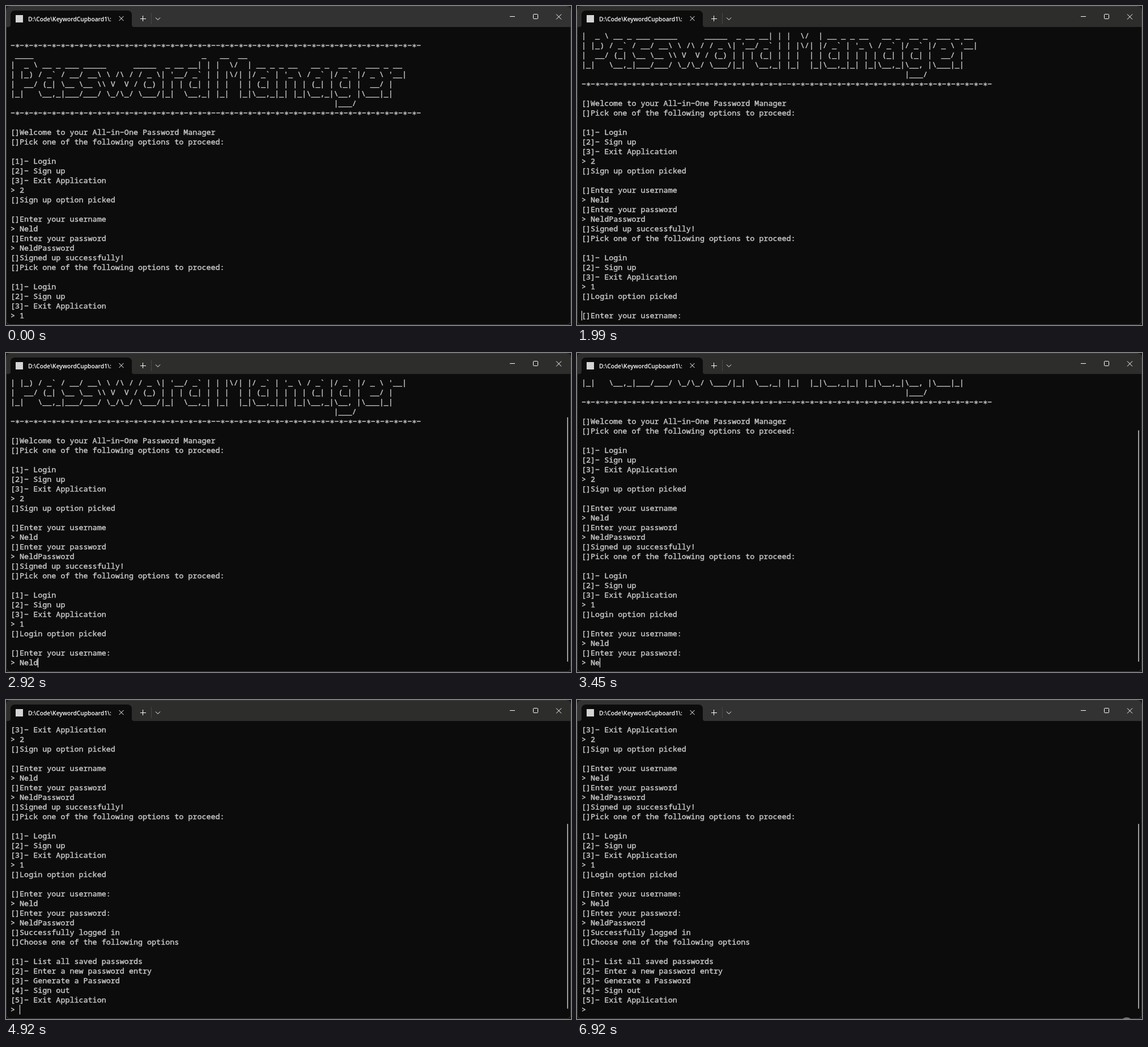
Recreate the animation shown at these times as an HTML page. Size 997 px wide and 562 px high, loop 6980 ms.

```html
<!DOCTYPE html>
<html lang="en">
<head>
<meta charset="utf-8">
<title>Terminal session</title>
<style>
  html, body { margin: 0; width: 100%; height: 100%; overflow: hidden; background: #161616; }
  #stage { position: relative; width: 997px; height: 562px; overflow: hidden; }
  #stage > * { position: absolute; }
  svg { left: 0; top: 0; overflow: visible; }
  #title {
    left: 39px; top: 14px; width: 149px; overflow: hidden; white-space: nowrap;
    font: 600 10.2px/18px "Open Sans", "Noto Sans", sans-serif; color: #fff;
  }
  #log {
    left: 8px; top: 44px; width: 970px; height: 510px; margin: 0; overflow: hidden;
    font: 400 13.4px/17px "Noto Sans Mono", "DejaVu Sans Mono", monospace;
    font-variant-ligatures: none; color: #ccc; -webkit-text-stroke: .4px #ccc;
  }
  #caret { top: 537px; width: 1px; height: 17px; background: #fff; }
  #thumb { left: 990px; width: 2px; border-radius: 1px; background: #9d9d9d; }
  #ring { width: 22px; height: 22px; margin: -11px 0 0 -11px; border-radius: 50%; }
</style>
</head>
<body>
<div id="stage">
  <svg width="997" height="562" fill="none" stroke="#fff">
    <rect x=".5" y=".5" width="996" height="561" rx="7" fill="#0c0c0c" stroke="#3d3d3d"/>
    <path id="bar" d="M1 37V8Q1 1 8 1H989Q996 1 996 8V37Z" stroke="none"/>
    <path d="M4 37Q8 37 8 33V16Q8 8 16 8H214Q222 8 222 16V33Q222 37 226 37Z" fill="#0c0c0c" stroke="none"/>
    <rect x="17" y="16" width="13" height="13" fill="#d4d4d4" stroke="none"/>
    <path d="M256.5 12V32" stroke="#464646"/>
    <path d="M199.5 18L207.5 26M207.5 18L199.5 26M237 22.5H247M241.5 17V27M264 20.5L268 24.5L272 20.5"/>
    <path d="M889 18.5H898M971 14.5L980 23.5M980 14.5L971 23.5"/>
    <rect x="930.5" y="14.5" width="8" height="8" rx="1"/>
  </svg>
  <div id="title">D:\Code\KeywordCupboard1\:</div>
  <pre id="log">

-*-*-*-*-*-*-*-*-*-*-*-*-*-*-*-*-*-*-*-*-*-*--*-*-*-*-*-*-*-*-*-*-*-*-*-*-*-*-*-*-*-*-*-*-
 ____                                     _   __  __
|  _ \ __ _ ___ _____      _____  _ __ __| | |  \/  | __ _ _ __   __ _  __ _  ___ _ __
| |_) / _` / __/ __\ \ /\ / / _ \| '__/ _` | | |\/| |/ _` | '_ \ / _` |/ _` |/ _ \ '__|
|  __/ (_| \__ \__ \\ V  V / (_) | | | (_| | | |  | | (_| | | | | (_| | (_| |  __/ |
|_|   \__,_|___/___/ \_/\_/ \___/|_|  \__,_| |_|  |_|\__,_|_| |_|\__,_|\__, |\___|_|
                                                                       |___/
-*-*-*-*-*-*-*-*-*-*-*-*-*-*-*-*-*-*-*-*-*-*--*-*-*-*-*-*-*-*-*-*-*-*-*-*-*-*-*-*-*-*-*-*-

[]Welcome to your All-in-One Password Manager
[]Pick one of the following options to proceed:

[1]- Login
[2]- Sign up
[3]- Exit Application
> 2
[]Sign up option picked

[]Enter your username
> Neld
[]Enter your password
> NeldPassword
[]Signed up successfully!
[]Pick one of the following options to proceed:

[1]- Login
[2]- Sign up
[3]- Exit Application
> 1
[]Login option picked

[]Enter your username:
> Neld
[]Enter your password:
> NeldPassword
[]Successfully logged in
[]Choose one of the following options

[1]- List all saved passwords
[2]- Enter a new password entry
[3]- Generate a Password
[4]- Sign out
[5]- Exit Application
> </pre>
  <div id="caret"></div>
  <div id="thumb"></div>
  <div id="ring"></div>
  <svg id="mouse" width="12" height="18">
    <path d="M.5 .5V14.5L3.8 11.4L6 16.4L8.2 15.4L6 10.6H10.4Z" fill="#fff" stroke="#000" stroke-width=".8"/>
  </svg>
</div>
<script>
const LOOP = 6980, ROWS = 30, CELL = 8.04, BLINK = 530, LAG = 60;
const FOCUS = 1260, BLUR = 6850;
const [bar, log, caret, thumb, ring, mouse] =
  ['bar', 'log', 'caret', 'thumb', 'ring', 'mouse'].map(id => document.getElementById(id));

// Wide dashes and centred stars, as terminal fonts draw them.
const lines = log.textContent.replace(/-/g, '\u2212').replace(/\*/g, '\u2217').split('\n');

// Prompts answered during the loop; the sign-up ones are already history.
const prompts = [...lines.keys()].filter(i => lines[i].startsWith('> ')).slice(3);

// First key, last key and Enter for each answer.
const answers = [
  { from: -1, to: 0, enter: 1990 },
  { from: 2450, to: 2920, enter: 2990 },
  { from: 3250, to: 4790, enter: 4850 }
];
const lastOutput = answers.at(-1).enter + LAG;

// Pointer paths through [time, x, y].
const paths = [
  [[130, 828, 503], [260, 777, 486], [answers[0].enter, 777, 486]],
  [[5320, 781, 478], [5580, 815, 540], [5920, 821, 541], [6220, 930, 566]]
];

const show = (el, on) => { el.style.visibility = on ? 'visible' : 'hidden'; };

function place(el, x, y) {
  el.style.left = x + 'px';
  el.style.top = y + 'px';
}

// Number of printed lines, and the caret column in the last one.
function progress(t) {
  const done = answers.filter(a => t >= a.enter).length;
  const row = prompts[done];
  if (done && t < answers[done - 1].enter + LAG) return { count: row, column: 0 };

  const answer = answers[done];
  let typed = 0;
  if (answer && t >= answer.from) {
    const length = lines[row].length - 2;
    const part = Math.min(1, (t - answer.from) / (answer.to - answer.from));
    typed = 1 + Math.floor(part * (length - 1) + 1e-6);
  }
  return { count: row + 1, column: 2 + typed };
}

function drawText(t) {
  const { count, column } = progress(t);
  const view = lines.slice(count - ROWS, count);
  if (column) view.push(view.pop().slice(0, column));
  const text = view.join('\n');
  if (log.textContent !== text) log.textContent = text;

  // Output and typing keep the caret lit; it blinks from the last input on.
  const input = t < answers[0].enter ? FOCUS : Math.min(t, lastOutput);
  caret.style.left = Math.round(8 + column * CELL) + 'px';
  show(caret, t >= FOCUS && t < BLUR && (t - input) % (2 * BLINK) < BLINK);

  const height = Math.round(489 * ROWS / count);
  thumb.style.top = 544 - height + 'px';
  thumb.style.height = height + 'px';
  show(thumb, t >= answers[0].enter + LAG);
}

function drawPointer(t) {
  const path = paths.find(p => t >= p[0][0] && t < p.at(-1)[0]);
  show(mouse, path);
  if (!path) return;
  const next = path.findIndex(point => t < point[0]);
  const [t0, x0, y0] = path[next - 1], [t1, x1, y1] = path[next];
  const k = (t - t0) / (t1 - t0);
  place(mouse, x0 + (x1 - x0) * k, y0 + (y1 - y0) * k);
}

// One click focuses the window, one outside it takes the focus away.
function drawFocus(t) {
  const away = t >= BLUR;
  bar.style.fill = t >= FOCUS && !away ? '#2d2d2b' : '#323233';
  ring.style.background = away ? '#707070' : '#848400';
  place(ring, away ? 970 : 777, away ? 570 : 485);
  show(ring, away || t >= FOCUS && t < FOCUS + LAG);
}

function tick() {
  const t = performance.now() % LOOP;
  drawText(t);
  drawPointer(t);
  drawFocus(t);
  requestAnimationFrame(tick);
}
tick();
</script>
</body>
</html>
```
